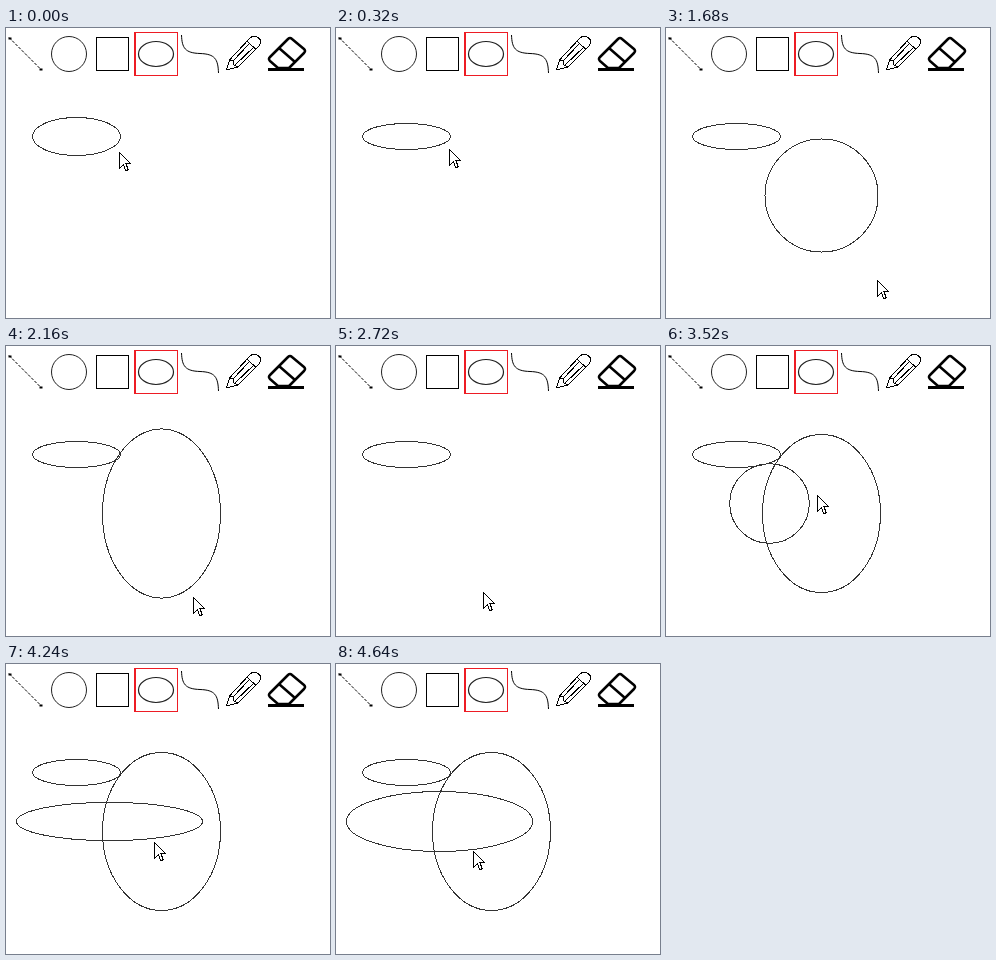
Recreate the animation shown at these times as an HTML page. Size 324 by 290 pixels, loop 4.8 s.

```html
<!DOCTYPE html>
<html lang="en">
<head>
<meta charset="utf-8">
<title>Ellipse tool</title>
<style>
  html, body { margin: 0; width: 100%; height: 100%; overflow: hidden; background: #fff; }
  svg { display: block; }
  .ink { fill: none; stroke: #000; }
  .crisp { shape-rendering: crispEdges; }
</style>
</head>
<body>
<svg width="324" height="290" viewBox="0 0 324 290">
  <g class="ink">
    <path d="M3 9.500L35 41.500" stroke-dasharray="3 1.500"/>
    <path d="M2.500 10.500h3M33.500 41.500h3" stroke-width="2"/>
    <circle cx="63" cy="26" r="17.500" stroke="#222"/>
    <rect class="crisp" x="90.500" y="9.500" width="32" height="33"/>
    <rect class="crisp" x="128.500" y="4.500" width="43" height="43" stroke="#ed1c24"/>
    <path class="crisp" d="M129.500 5v42" stroke="#ed1c24"/>
    <ellipse cx="150" cy="26" rx="17.500" ry="12.500" stroke="#222" stroke-width="1.200"/>
    <path d="M175.500 7C176 20 179 25 194 25.500S212 31 212.500 45"/>
    <g class="crisp" stroke-linejoin="round">
      <path d="M220.500 42L223.500 32L244 10Q248 6.500 252 9.500Q257 13 253 18L232 39Z"/>
      <path d="M223.500 32L227 33L228 37L232 39M241 13L250 21.500M227 33L243 16M229 37L248 19"/>
    </g>
    <g stroke-width="2.500" stroke-linejoin="round">
      <path d="M264 29L282 11Q284 9 286 11L298 21Q300 23 298 25L283 40H272L264 33Q262 31 264 29ZM273 20L289 34"/>
      <path class="crisp" d="M262 41.500H298" stroke-width="3"/>
    </g>
  </g>
  <g class="ink crisp" id="shapes" stroke="#333" style="stroke: #333"></g>
  <path id="cursor" class="crisp" fill="#fff" stroke="#000"
        d="M.5.5V16.500L4.500 12.500L6.500 18.500H8.500L9 17.500L7 11.500H11.500Z"/>
</svg>
<script>
const LOOP = 4800, STEP = 80, LAG = 40;

const linear = k => k;
const easeIn = p => k => k ** p;
const easeOut = p => k => 1 - (1 - k) ** p;

// The pointer rests between legs
const home = { x: 113, y: 127 };
const legs = [
  { from: -40,  to: 320,  x: 113, y: 121, ease: easeOut(6) },
  { from: 640,  to: 1040, x: 155, y: 166, ease: linear },
  { from: 1120, to: 1920, x: 213, y: 254, ease: easeOut(3) },
  { from: 2000, to: 2400, x: 147, y: 246, ease: linear },
  { from: 2720, to: 3200, x: 103, y: 157, ease: linear },
  { from: 3200, to: 3680, x: 195, y: 142, ease: easeIn(1.6) },
  { from: 3760, to: 4080, x: 154, y: 174, ease: linear },
  { from: 4160, to: 4400, x: 137, y: 187, ease: linear }
];

// A drag sets a circle until `turn`, then only its height until `end`
const ellipses = [
  { cx: 70,  cy: 108, start: 0,    turn: -40,  end: 320 },
  { cx: 155, cy: 167, start: 1200, turn: 2000, end: 2480, redraw: 2720 },
  { cx: 103, cy: 157, start: 3280, turn: 3760, end: 4480, redraw: 4560 }
];

function pointer(t) {
  let { x, y } = home;
  for (const leg of legs) {
    const k = Math.min(1, Math.max(0, (t - leg.from) / (leg.to - leg.from)));
    const e = leg.ease(k);
    x += (leg.x - x) * e;
    y += (leg.y - y) * e;
  }
  return { x, y };
}

function radii({ cx, cy, turn, end }, t) {
  const seen = t - LAG;
  const rx = Math.abs(pointer(Math.min(seen, turn)).x - cx) + 1;
  const ry = t <= turn ? rx : Math.abs(pointer(Math.min(seen, end)).y - cy);
  return { rx, ry };
}

const layer = document.getElementById("shapes");
const cursor = document.getElementById("cursor");

function setAll(node, attributes) {
  for (const name in attributes) node.setAttribute(name, attributes[name]);
}

for (const e of ellipses) {
  e.node = document.createElementNS(layer.namespaceURI, "ellipse");
  setAll(e.node, { cx: e.cx + 0.5, cy: e.cy + 0.5 });
  layer.append(e.node);
}

function draw(t) {
  for (const e of ellipses) {
    setAll(e.node, radii(e, t));
    e.node.style.display = t >= e.start && t !== e.redraw ? "" : "none";
  }
  const { x, y } = pointer(t);
  setAll(cursor, { transform: `translate(${Math.round(x)} ${Math.round(y)})` });
}

const start = performance.now();
function tick() {
  const t = (performance.now() - start) % LOOP;
  draw(Math.floor(t / STEP) * STEP);
  requestAnimationFrame(tick);
}
draw(0);
requestAnimationFrame(tick);
</script>
</body>
</html>
```
